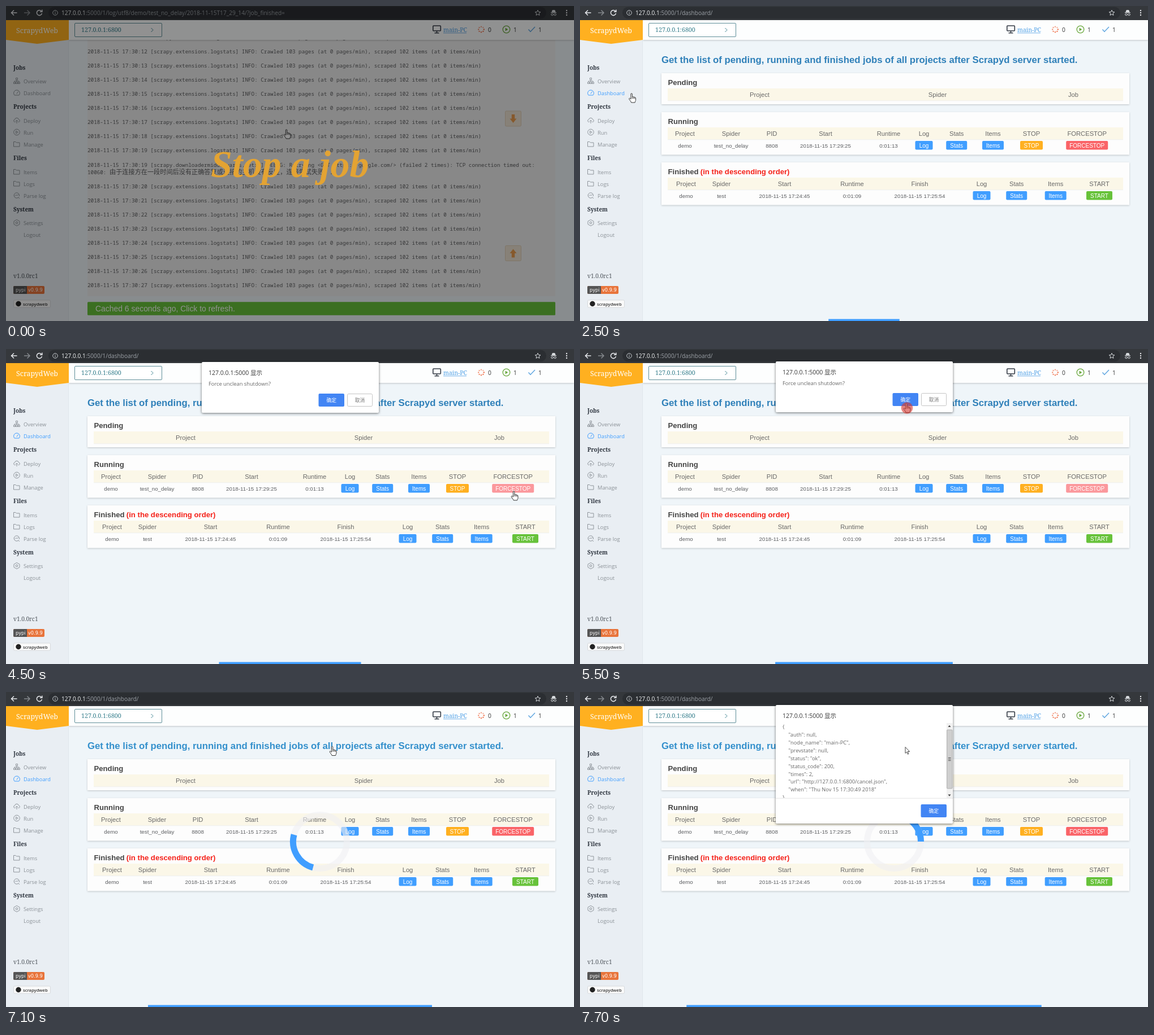
Write an HTML page that moves like this. It is 1004 by 558 pixels and loops after 8 s.

```html
<!DOCTYPE html>
<html lang="en">
<head>
<meta charset="utf-8">
<title>Stop a job</title>
<style>
  html, body { margin: 0; width: 100%; height: 100%; overflow: hidden; background: #eff5f9; }
  svg { display: block; width: 1004px; height: 558px; }
  text { white-space: pre; }
  .ui { font-family: "Open Sans", "Noto Sans", "Noto Sans CJK SC", sans-serif; }
  .serif { font-family: "Noto Serif", serif; }
  .arial { font-family: "Liberation Sans", Arial, sans-serif; }
  .mono { font-family: "Noto Sans Mono", "Liberation Mono", monospace; }
  .cjk { font-family: "Noto Sans CJK SC", "Noto Sans CJK", sans-serif; }
  .badge { font-family: "DejaVu Sans", sans-serif; }
  .bold { font-weight: 700; }
  .mid { text-anchor: middle; }
  .icon { fill: none; stroke: #8f959b; stroke-width: 1; }
  .shadow { filter: drop-shadow(0 1px 1.5px rgba(0, 0, 0, .2)); }
  .popup { filter: drop-shadow(0 1px 2px rgba(0, 0, 0, .55)); }
</style>
</head>
<body>
<svg id="stage" viewBox="0 0 1004 558" xmlns="http://www.w3.org/2000/svg"></svg>
<script>
const HOST = 'main-PC';
const BLUE = '#409eff', GREEN = '#67c23a', AMBER = '#ffb020', RED = '#fa6468';

const text = (x, y, str, size, fill, cls = 'ui', id = '') =>
  `<text x="${x}" y="${y}" font-size="${size}" fill="${fill}" class="${cls}"${id && ` id="${id}"`}>${
    str.replace(/</g, '&lt;').replace(/>/g, '&gt;')}</text>`;
const rect = (x, y, w, h, fill, more = '') =>
  `<rect x="${x}" y="${y}" width="${w}" height="${h}" fill="${fill}" ${more}/>`;
const path = (d, more = '') => `<path d="${d}" ${more}/>`;
const group = (id, body, more = '') => `<g id="${id}" ${more}>${body}</g>`;
const at = (x, y, body) => `<g transform="translate(${x} ${y})">${body}</g>`;

function toolbar() {
  const line = 'fill="none" stroke-width="1.5" stroke=';
  return rect(0, 0, 1004, 25, '#35383c') +
    rect(75, 1.5, 880, 21, '#2b2e32', 'rx="10.5"') +
    path('M19.5 12H10M14 7.5L9.5 12L14 16.5', line + '"#e8eaed"') +
    path('M32 12H41.5M37.5 7.5L42 12L37.5 16.5', line + '"#84888c"') +
    path('M62.5 9A4.6 4.6 0 1 0 63.5 13M63.8 6.5V10.3H60', line + '"#e8eaed"') +
    '<circle cx="87" cy="12" r="4.3" fill="none" stroke="#c5c9cd"/>' +
    path('M87 11.3V14.4M87 9.2V10.3', 'stroke="#c5c9cd"') +
    `<text x="98" y="15.5" font-size="10.15" class="ui" fill="#9ca1a7"><tspan fill="#f1f3f4">127.0.0.1</tspan><tspan id="url"></tspan></text>` +
    path('M940 7.3L941.4 10.5L944.8 10.8L942.2 13L943 16.4L940 14.6L937 16.4L937.8 13L935.2 10.8L938.6 10.5Z',
      'fill="none" stroke="#d5d8db"') +
    path('M963 11.5H973M965 10.5L966 7.5H970L971 10.5Z', 'fill="#d5d8db" stroke="#d5d8db"') +
    '<g fill="none" stroke="#d5d8db"><circle cx="965.5" cy="15" r="1.8"/><circle cx="970.5" cy="15" r="1.8"/></g>' +
    [8, 12, 16].map(y => `<circle cx="991" cy="${y}" r="1.2" fill="#e8eaed"/>`).join('');
}

function header() {
  const dots = Array.from({ length: 8 }, (_, i) => {
    const a = i * Math.PI / 4;
    return `<circle cx="${840 + 4.8 * Math.cos(a)}" cy="${41.5 + 4.8 * Math.sin(a)}" r="1.2" fill="#f0714a" opacity="${1 - i * .06}"/>`;
  }).join('');
  return rect(111, 25, 893, 35, '#fdfefe', 'class="shadow"') +
    rect(121.5, 30.5, 154, 24, '#fff', 'rx="1.5" stroke="#5f8f99"') +
    text(133, 46, '127.0.0.1:6800', 10.7, '#39808e', 'serif') +
    path('M256.5 39L260 42.5L256.5 46', 'fill="none" stroke="#39808e"') +
    rect(754.8, 35, 13.5, 9, 'none', 'rx="1" stroke="#333a44" stroke-width="1.6"') +
    path('M761.5 44V47.5M757.5 47.8H765.5', 'stroke="#333a44" stroke-width="1.6"') +
    text(773, 46, HOST, 10.5, '#4d9fe6', 'serif') +
    path('M773 47.8H814', 'stroke="#4d9fe6" stroke-width=".8"') +
    dots +
    '<circle cx="884.5" cy="41.5" r="6.3" fill="none" stroke="#6aa83e" stroke-width="1.3"/>' +
    path('M882.6 38.6V44.4L887.3 41.5Z', 'fill="#6aa83e"') +
    path('M923.5 41.5L927 45.5L935 37', 'fill="none" stroke="#5fa6e0" stroke-width="1.5"') +
    [[852, 0], [897, 1], [941, 1]].map(([x, n]) => text(x, 46, String(n), 10.3, '#333')).join('');
}

const folder = 'M.5 1.5H4L5.5 3H11V10H.5Z';
const ICONS = {
  Overview: 'M4.5 .5H7.5V3.5H4.5ZM6 3.5V7M2 8V6H10V8M.5 8H3.5V10.5H.5ZM4.5 8H7.5V10.5H4.5ZM8.5 8H11.5V10.5H8.5Z',
  Dashboard: 'M2 10A5.4 5.4 0 1 1 10 10ZM5.8 7.5L8.5 3.5',
  Deploy: 'M3.5 8.5H2.5A2.3 2.3 0 0 1 2.5 4A3.6 3.6 0 0 1 9.5 4A2.3 2.3 0 0 1 9.5 8.5H8.5M6 11V5.5M4 7.3L6 5.3L8 7.3',
  Run: 'M.7 5.5A5.3 5.3 0 1 1 11.3 5.5A5.3 5.3 0 1 1 .7 5.5ZM4.7 3.2V7.8L8.3 5.5Z',
  Manage: folder, Items: folder, Logs: folder,
  'Parse log': 'M9 9A4.7 4.7 0 1 1 10.3 7M8.8 8.7L11 11M3 6.5L5 4.5L6.5 6L9.5 3',
  Settings: 'M6 0L11 2.8V8.2L6 11L1 8.2V2.8ZM4.2 5.5A1.8 1.8 0 1 1 7.8 5.5A1.8 1.8 0 1 1 4.2 5.5Z'
};
const MENU = [
  ['Jobs', 109, ['Overview', 'Dashboard'], 133],
  ['Projects', 178.5, ['Deploy', 'Run', 'Manage'], 203],
  ['Files', 269, ['Items', 'Logs', 'Parse log'], 294],
  ['System', 360, ['Settings', 'Logout'], 384.5]
];

function sidebar() {
  const menu = MENU.map(([title, ty, items, y0]) =>
    text(13, ty + 3.5, title, 10, '#2f3640', 'serif bold') +
    items.map((name, i) => {
      const y = y0 + i * 21;
      const row = at(13, y - 6, path(ICONS[name] || '', 'class="icon"')) +
        text(31, y + 3.6, name, 9.3, '#8b9197');
      return name === 'Dashboard' ? group('dash', row) : row;
    }).join('')).join('');
  return rect(0, 25, 110.5, 533, '#e9eef3') + rect(110, 60, 1, 498, '#dfe6ec') +
    path('M0 25H111V60L55 67L0 60Z', `fill="${AMBER}"`) +
    text(55, 47.5, 'ScrapydWeb', 12.4, '#fff', 'serif mid') +
    rect(0, 144, 110, 21, '#fff', 'id="hover"') + menu +
    text(13, 482, 'v1.0.0rc1', 10.2, '#555b62', 'serif') +
    rect(13, 496, 55, 14, '#e8743b', 'rx="2"') +
    path('M15 496H37V510H15Q13 510 13 508V498Q13 496 15 496', 'fill="#555"') +
    text(17, 506, 'pypi', 8.2, '#fff', 'badge') + text(39, 506, 'v0.9.9', 8.2, '#fff', 'badge') +
    rect(13.5, 521, 65, 13, '#fafafa', 'rx="2" stroke="#d6d9dc"') +
    '<circle cx="22" cy="527.5" r="4.7" fill="#222"/>' +
    `<g font-weight="600">${text(30, 530.5, 'scrapydweb', 7.6, '#333')}</g>`;
}

function log() {
  const size = 9.296, ink = '#5c5d5f';
  let rows = '';
  for (let i = -1; i < 16; i++) {
    const y = i < 8 ? 84 + 25.07 * i : 323 + 25.07 * (i - 8);
    rows += text(144, y, `2018-11-15 17:30:${12 + i} [scrapy.extensions.logstats] INFO: Crawled 103 pages (at 0 pages/min), scraped 102 items (at 0 items/min)`, size, ink, 'mono');
  }
  rows += text(144, 285, '2018-11-15 17:30:19 [scrapy.downloadermiddlewares.retry] DEBUG: Retrying <GET https://google.com/> (failed 2 times): TCP connection timed out:', size, ink, 'mono') +
    text(144, 297.5, '10060:', size, ink, 'mono') +
    text(183, 298, '由于连接方在一段时间后没有正确答复或连接的主机没有反应，连接尝试失败。.', 11.16, ink, 'cjk');
  const jump = (y, turn) => at(896.5, y,
    rect(-14, -13.5, 28, 27, '#ece3d3', 'rx="2" stroke="#dfcdb4"') +
    path('M-2.7 -7.5H2.7V0H6L0 7.5L-6 0H-2.7Z', `transform="rotate(${turn})"`));
  return rect(144, 60, 827, 454, '#eeeeee') + rows +
    group('jumps', jump(199.5, 0) + jump(438, 180)) +
    rect(144, 524.3, 827, 23.4, GREEN, 'rx="1.5"') +
    text(158, 541, '', 13.93, '#fff', 'arial', 'cached');
}

const button = (cx, cy, w, label, fill, id = '') =>
  rect(cx - w / 2, cy - 8, w, 15.6, fill, `rx="2"${id && ` id="${id}"`}`) +
  text(cx, cy + 3.6, label, 10, '#fff', 'arial mid');

// cells: [centre, heading, value] or [centre, heading, null, button width, colour, id]
function card(y, h, title, cells) {
  return rect(144, y, 827, h, '#fdfdfd', 'class="shadow"') +
    text(155.5, y + 20.5, title, 13.15, '#444', 'arial bold') +
    rect(155, y + 27, 805, 22, '#fbf7e8') + rect(155, y + 48.5, 805, .8, '#ebeef2') +
    cells.map(([x, name, value, w, fill, id]) =>
      text(x, y + 41.5, name, 11.2, '#686868', 'arial mid') +
      (w ? button(x, y + 59, w, name, fill, id)
        : value ? text(x, y + 62.5, value, 9.75, '#5c5e61', 'arial mid') : '')).join('');
}

function dashboard() {
  return text(144, 100.5, 'Get the list of pending, running and finished jobs of all projects after Scrapyd server started.', 16.74, '#2f80b9', 'arial bold', 'heading') +
    card(119, 55, 'Pending', [[317.5, 'Project'], [632, 'Spider'], [872, 'Job']]) +
    card(188, 75.5, 'Running', [
      [185.5, 'Project', 'demo'], [267, 'Spider', 'test_no_delay'], [339, 'PID', '8808'],
      [434, 'Start', '2018-11-15 17:29:25'], [545.5, 'Runtime', '0:01:13'],
      [608, 'Log', null, 31, BLUE], [665.7, 'Stats', null, 37, BLUE], [730, 'Items', null, 38, BLUE],
      [798, 'STOP', null, 40, AMBER], [896.2, 'FORCESTOP', null, 74, RED, 'force']]) +
    card(277, 75.5, 'Finished', [
      [187.5, 'Project', 'demo'], [250, 'Spider', 'test'], [361.5, 'Start', '2018-11-15 17:24:45'],
      [481, 'Runtime', '0:01:09'], [600.5, 'Finish', '2018-11-15 17:25:54'],
      [710, 'Log', null, 31, BLUE], [771.7, 'Stats', null, 37, BLUE], [840.7, 'Items', null, 38, BLUE],
      [918, 'START', null, 46, GREEN]]) +
    text(212.8, 297.5, '(in the descending order)', 13.15, '#f5221a', 'arial bold');
}

function spinner() {
  const ring = 'r="47.5" fill="none" stroke-width="11"';
  return at(555, 265, `<circle ${ring} stroke="#f0f1f3" stroke-opacity=".6"/>` +
    path('M33.6 -33.6A47.5 47.5 0 0 1 33.6 33.6', `fill="none" stroke="${BLUE}" stroke-width="11" id="arc"`));
}

const dialogBox = h => rect(346, 23, 313, h, '#fff', 'rx="2" class="popup"') +
  text(358, 45.5, '127.0.0.1:5000 显示', 10.5, '#383838');
const okButton = (x, y) => rect(x, y, 45.5, 23, '#4285f4', 'rx="2"') +
  text(x + 22.7, y + 14.7, '确定', 8.8, '#fff', 'cjk mid');

function confirmBox() {
  return dialogBox(90) + text(358, 65, 'Force unclean shutdown?', 9.3, '#686868') +
    okButton(552.5, 79) + rect(603.5, 79.5, 44, 22, '#fff', 'rx="2" stroke="#c4c4c4"') +
    text(625.5, 93.7, '取消', 8.8, '#777', 'cjk mid');
}

function resultBox() {
  const lines = ['"auth": null,', `"node_name": "${HOST}",`, '"prevstate": null,', '"status": "ok",',
    '"status_code": 200,', '"times": 2,', '"url": "http://127.0.0.1:6800/cancel.json",',
    '"when": "Thu Nov 15 17:30:49 2018"'];
  const json = ['{', ...lines, '}'].map((s, i) =>
    text(s.length > 1 ? 368.5 : 358, 64.8 + i * 13.95, s, 9.27, '#686868')).join('');
  return dialogBox(210) +
    `<clipPath id="pane"><path d="M346 54H648V187.5H346Z"/></clipPath><g clip-path="url(#pane)">${json}</g>` +
    rect(648, 55, 10.5, 133, '#f1f1f1') + rect(648.5, 67, 9.5, 104, '#cfcfcf', 'rx="1" stroke="#a5a5a5" stroke-width=".8"') +
    path('M650.5 62L653 58.8L655.5 62ZM650.5 181.5L653 184.7L655.5 181.5Z', 'fill="#444"') +
    path('M650.8 116.5H655.5M650.8 119H655.5M650.8 121.5H655.5', 'stroke="#555"') +
    rect(346, 187.8, 313, .9, '#e2e2e2') + okButton(602.5, 199);
}

// the click mark lies over the hand and tints it
function cursor() {
  return group('hand', path('M-2.6 -7C-2.6 -8.6 -.2 -8.6 -.2 -7V-2.3C.5 -3 1.8 -2.7 2 -1.7C2.8 -2.4 4.1 -1.9 4.2 -1C5.2 -1.4 6 -.7 6 .3V3.5C6 5.2 4.9 6 4.6 8H-1.9C-2.3 6 -5.2 3.2 -5.8 1.6C-6.2 .4 -4.7 -.2 -3.8 .8L-2.6 2.1ZM-.2 -2.3V1.2M2 -1.7V1.2M4.2 -1V1.5',
      'fill="#fff" stroke="#333" stroke-width="1"')) +
    group('arrow', path('M-3 -7V4L-.5 1.7L1.3 5.8L3 5L1.2 1H4.6Z', 'fill="#fff" stroke="#444"')) +
    group('click', '<circle r="10.3" fill="#d63a32" fill-opacity=".62"/>');
}

const $ = id => document.getElementById(id);
$('stage').innerHTML =
  rect(0, 0, 1004, 558, '#eff5f9') + group('log', log()) + group('jobs', dashboard()) +
  header() + sidebar() + toolbar() + group('spin', spinner()) +
  group('confirm', confirmBox()) + group('result', resultBox()) + group('cursor', cursor()) +
  group('intro', rect(0, 0, 1004, 558, '#000', 'fill-opacity=".43"') +
    `<g font-family="'Liberation Serif', serif" font-style="italic" font-weight="700">${
      text(362, 303, 'Stop a job', 68, '#e3a333', '')}</g>`) +
  rect(0, 554.5, 0, 3.5, BLUE, 'id="bar"');

// start time, cursor x and y, visible parts
const STEPS = [
  [0, 497, 227, 'log intro hand'],
  [1500, 92.5, 163, 'log hover hand click'],
  [2500, 92.5, 163, 'jobs hand'],
  [3500, 899, 260, 'jobs force hand click'],
  [4500, 899, 260, 'jobs force hand confirm'],
  [5500, 578, 104.5, 'jobs force hand click confirm'],
  [6500, 578, 104.5, 'jobs spin hand'],
  [6800, 578, 104.5, 'jobs spin hand'],
  [7100, 578, 104.5, 'jobs spin hand'],
  [7400, 578, 104.5, 'jobs spin hand'],
  [7700, 578, 104.5, 'jobs spin arrow result']
];
const PARTS = ['log', 'jobs', 'intro', 'hover', 'hand', 'arrow', 'click', 'confirm', 'spin', 'result'];
let shown = -1;

function show(n) {
  const [, x, y, list] = STEPS[n];
  const on = list.split(' ');
  for (const id of PARTS) $(id).style.display = on.includes(id) ? '' : 'none';
  const onLog = on.includes('log');
  $('url').textContent = onLog ? ':5000/1/log/utf8/demo/test_no_delay/2018-11-15T17_29_14/?job_finished=' : ':5000/1/dashboard/';
  $('cached').textContent = `Cached ${n ? 9 : 6} seconds ago, Click to refresh.`;
  $('jumps').setAttribute('fill', on.includes('intro') ? '#eb9c4e' : '#dc7f70');
  $('cursor').setAttribute('transform', `translate(${x} ${y})`);
  $('confirm').setAttribute('transform', `translate(0 ${on.includes('click') ? -1 : 0})`);
  $('force').setAttribute('fill', on.includes('force') ? '#fb989c' : RED);
  $('heading').setAttribute('fill', on.includes('spin') ? '#3490cc' : '#2f80b9');
  const tint = !onLog ? BLUE : on.includes('hover') ? '#3c4248' : '#8b9197';
  $('dash').querySelector('path').style.stroke = tint;
  $('dash').querySelector('text').style.fill = tint;
  $('arc').setAttribute('transform', `rotate(${150 + 82.5 * (n - 8)})`);
  const w = 62.75 * n;
  $('bar').setAttribute('x', 502 - w / 2);
  $('bar').setAttribute('width', w);
}

const start = performance.now();
function tick() {
  const t = (performance.now() - start) % 8000;
  const n = STEPS.findLastIndex(s => s[0] <= t);
  if (n !== shown) show(shown = n);
  requestAnimationFrame(tick);
}
tick();
</script>
</body>
</html>
```
